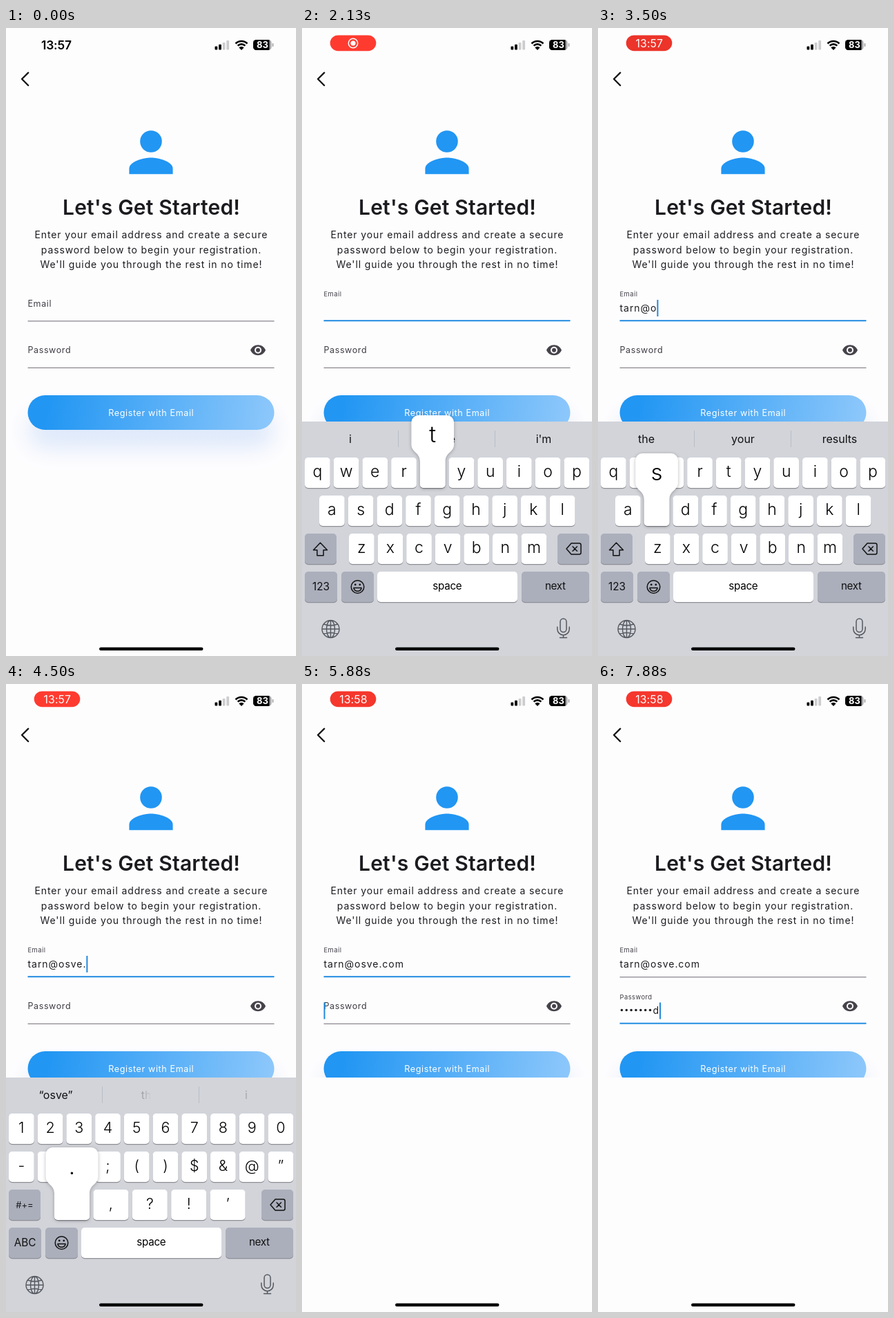
An HTML page with a canvas for the animation above (8 s loop, 420 px wide and 908 px high).

```html
<!DOCTYPE html>
<html lang="en">
<head>
<meta charset="utf-8">
<title>Registration form</title>
<style>
html, body { margin: 0; width: 100%; height: 100%; overflow: hidden; background: #fefdfe; }
canvas { display: block; width: 420px; height: 908px; }
</style>
</head>
<body>
<canvas id="stage"></canvas>
<script>
const W = 420, H = 908, LOOP = 8000, STEP = 125;
const BLUE = '#2196f3', INK = '#1c1b1f', PAGE = '#fefdfe';
const FONT = 'Inter, Roboto, sans-serif';
const canvas = document.getElementById('stage');
const ctx = canvas.getContext('2d');
const dpr = window.devicePixelRatio || 1;
canvas.width = W * dpr;
canvas.height = H * dpr;

// Timeline in ms
const PILL_IN = 500, FOCUS_EMAIL = 1375, CLOCK_BACK = 3000, MINUTE = 5250, FOCUS_PASS = 5875;
const KEYS_TOP = 569, SLIDE = 497;
const presses = [
  [2125, 't'], [2375, 'a'], [2500, 'r'], [2625, 'n'], [3000, '@'], [3250, 'o'],
  [3500, 's'], [3750, 'v'], [4000, 'e'], [4375, '.', 250], [4875, 'c'], [5000, 'o'], [5125, 'm']
].map(([at, key, hold = STEP]) => ({ at, key, hold }));
const SECRET = 'password', SECRET_AT = 6625, SECRET_GAP = 175;

const clamp = v => Math.max(0, Math.min(1, v));
const lerp = (a, b, p) => a + (b - a) * p;
const smooth = p => p * p * (3 - 2 * p);
const easeOut = p => 1 - (1 - p) ** 3;
const ramp = (t, start, dur) => clamp((t - start) / dur);
const mix = (a, b, p) => `rgb(${a.map((v, i) => Math.round(lerp(v, b[i], p)))})`;

function text(s, x, y, size, { color = INK, weight = 400, align = 'center', gap = 0 } = {}) {
  ctx.font = `${weight} ${size}px ${FONT}`;
  ctx.letterSpacing = gap + 'px';
  ctx.textAlign = align;
  ctx.fillStyle = color;
  ctx.fillText(s, align === 'center' ? x + gap / 2 : x, y);
  return ctx.measureText(s).width;
}

function box(x, y, w, h, r, color) {
  ctx.beginPath();
  ctx.roundRect(x, y, w, h, r);
  ctx.fillStyle = color;
  ctx.fill();
}

function disc(x, y, r, color) {
  ctx.beginPath();
  ctx.arc(x, y, r, 0, 7);
  ctx.fillStyle = color;
  ctx.fill();
}

function line(d, x, y, width, color = '#111') {
  ctx.save();
  ctx.translate(x, y);
  ctx.lineWidth = width;
  ctx.lineCap = ctx.lineJoin = 'round';
  ctx.strokeStyle = color;
  ctx.stroke(new Path2D(d));
  ctx.restore();
}

function icon(d, x, y, scale, color) {
  ctx.save();
  ctx.translate(x, y);
  ctx.scale(scale, scale);
  ctx.fillStyle = color;
  ctx.fill(new Path2D(d), 'evenodd');
  ctx.restore();
}

function shadow(color, blur, dy) {
  ctx.shadowColor = color;
  ctx.shadowBlur = blur * dpr;
  ctx.shadowOffsetY = dy * dpr;
}

function statusBar(t) {
  const show = ramp(t, PILL_IN, 250);
  const clock = t < MINUTE ? '13:57' : '13:58';
  ctx.globalAlpha = 1 - show;
  text('13:57', 73, 31.2, 17.4, { weight: 600, color: '#000', gap: -0.1 });
  ctx.globalAlpha = show;
  const glow = 0.5 - 0.5 * Math.cos((t - 1500) / 2000 * Math.PI * 2);
  box(40.7, 10.4, 66.6, 22.8, 11.4, mix([236, 52, 42], [255, 59, 48], clamp(glow * 1.6)));
  if (t < CLOCK_BACK) {
    ctx.beginPath();
    ctx.arc(74, 22, 6.7, 0, 7);
    ctx.lineWidth = 1.5;
    ctx.strokeStyle = '#fff';
    ctx.stroke();
    disc(74, 22, 3.6, '#fff');
  } else {
    text(clock, 74.3, 27.6, 15.8, { color: '#fff', gap: 0.1 });
  }
  ctx.globalAlpha = 1;

  for (let i = 0; i < 4; i++) {
    const h = 5 + i * 2.8;
    box(302.5 + i * 5.6, 31.5 - h, 3.8, h, 1, i < 2 ? '#000' : '#cdccce');
  }
  ctx.strokeStyle = '#000';
  ctx.lineCap = 'butt';
  ctx.lineWidth = 2.6;
  for (const r of [12, 7.6]) {
    ctx.beginPath();
    ctx.arc(341, 31, r, -Math.PI * 0.75, -Math.PI * 0.25);
    ctx.stroke();
  }
  ctx.beginPath();
  ctx.moveTo(341, 32);
  ctx.arc(341, 32, 5.2, -Math.PI * 0.75, -Math.PI * 0.25);
  ctx.fillStyle = '#000';
  ctx.fill();

  box(358, 17, 26.5, 15, 4.5, '#a9a8aa');
  ctx.save();
  ctx.beginPath();
  ctx.rect(357, 16, 24.5, 17);
  ctx.clip();
  box(358, 17, 26.5, 15, 4.5, '#000');
  ctx.restore();
  box(385.6, 22, 1.8, 5, 1, '#a9a8aa');
  text('83', 371.5, 29.2, 13, { weight: 700, color: '#fff' });
}

function field(label, y, focus, filled) {
  const p = smooth(filled);
  text(label, 31.5, y + lerp(4.5, -9.6, p), lerp(12.5, 9.4, p),
    { align: 'left', color: '#3f3d44', gap: lerp(0.6, 0.45, p) });
  const h = lerp(1.1, 2, focus);
  ctx.fillStyle = mix([122, 118, 127], [33, 140, 225], focus);
  ctx.fillRect(31.5, y + 25.8 - h / 2 - focus * 0.6, 357, h);
}

function caret(x, y, t, since) {
  if ((t - since) % 1000 >= 500) return;
  ctx.fillStyle = '#2189dc';
  ctx.fillRect(x, y - 5, 2, 24);
}

function form(t) {
  ctx.save();
  if (t >= FOCUS_PASS) {
    ctx.beginPath();
    ctx.rect(0, 0, W, KEYS_TOP);
    ctx.clip();
  }
  line('M9.2 0L0 9.2L9.2 18.4', 23, 64.6, 2.3);
  disc(210, 164, 15.8, BLUE);
  icon('M12 14c-2.67 0-8 1.34-8 4v2h16v-2c0-2.66-5.33-4-8-4z', 162.6, 132.3, 3.95, BLUE);
  text("Let's Get Started!", 210.5, 270, 30, { weight: 600, gap: 0.2 });
  ['Enter your email address and create a secure',
   'password below to begin your registration.',
   "We'll guide you through the rest in no time!"
  ].forEach((s, i) => text(s, 210, 304.2 + i * 21.6, 14, { gap: 0.88 }));

  const onEmail = ramp(t, FOCUS_EMAIL, 167), onPass = ramp(t, FOCUS_PASS, 167);
  field('Email', 398, onEmail * (1 - onPass), onEmail);
  field('Password', 465.5, onPass, onPass);
  icon('M12 4.5C7 4.5 2.73 7.61 1 12c1.73 4.39 6 7.5 11 7.5s9.27-3.11 11-7.5c-1.73-4.39-6-7.5-11-7.5z' +
       'M12 17a5 5 0 1 1 0-10 5 5 0 0 1 0 10zM12 9a3 3 0 1 0 0 6 3 3 0 0 0 0-6z', 353, 453.7, 1, '#46434b');

  const typed = presses.filter(p => t >= p.at + STEP);
  const email = typed.map(p => p.key).join('');
  const width = email ? text(email, 31.5, 409.5, 14, { align: 'left', gap: 0.95 }) : 0;
  if (t >= FOCUS_EMAIL && t < FOCUS_PASS) {
    const last = typed[typed.length - 1];
    caret(31.5 + width, 398, t, last ? last.at + STEP : FOCUS_EMAIL);
  }

  if (t >= FOCUS_PASS) {
    const n = t < SECRET_AT ? 0 : Math.min(8, 1 + Math.floor((t - SECRET_AT) / SECRET_GAP));
    for (let i = 0; i < n - 1; i++) disc(34.4 + i * 6.85, 471.5, 1.75, INK);
    let x = 31.5;
    if (n) {
      x += (n - 1) * 6.85;
      x += text(SECRET[n - 1], x, 477, 14, { align: 'left', gap: 0.95 });
    }
    caret(x, 465.5, t, n ? SECRET_AT + (n - 1) * SECRET_GAP : FOCUS_PASS);
  }

  const fill = ctx.createLinearGradient(60, 531, 389, 575);
  fill.addColorStop(0, BLUE);
  fill.addColorStop(1, '#8ec8fb');
  ctx.save();
  shadow('rgba(50,125,230,.17)', 34, 26);
  box(31.5, 531, 357, 50, 25, fill);
  ctx.restore();
  text('Register with Email', 210, 560.5, 12.6, { color: '#fff', gap: 0.6 });
  ctx.restore();
}

// Key rows: characters, left edge, key width, pitch
const PLANES = {
  letters: [['qwertyuiop', 4, 36.7, 41.72], ['asdfghjkl', 25, 36.7, 41.72], ['zxcvbnm', 68, 36.7, 41.6]],
  symbols: [['1234567890', 4, 36.7, 41.72], ['-/:;()$&@”', 4, 36.7, 41.72], ['.,?!’', 70, 51, 56.4]]
};

function keyCap(x, y, w, color = '#fff') {
  box(x, y + 1.2, w, 44, 5, '#8d8f95');
  box(x, y, w, 44, 5, color);
}

function popup(k) {
  const { x, y, w, ch } = k, l = x - 12.5, r = x + w + 12.5, top = y - 61;
  ctx.save();
  shadow('rgba(0,0,0,.28)', 5, 1);
  ctx.beginPath();
  ctx.moveTo(l + 10, top);
  ctx.arcTo(r, top, r, top + 10, 10);
  ctx.lineTo(r, y - 19);
  ctx.bezierCurveTo(r, y - 7, x + w, y - 8, x + w, y + 6);
  ctx.arcTo(x + w, y + 44, x + w - 5, y + 44, 5);
  ctx.arcTo(x, y + 44, x, y + 39, 5);
  ctx.lineTo(x, y + 6);
  ctx.bezierCurveTo(x, y - 8, l, y - 7, l, y - 19);
  ctx.arcTo(l, top, l + 10, top, 10);
  ctx.fillStyle = '#fff';
  ctx.fill();
  ctx.restore();
  text(ch, x + w / 2, y - 22, 33, { color: '#000', weight: 300 });
}

function suggestions(t) {
  const put = (s, x, color = '#111') => text(s, x, 599.7, 16, { color });
  if (t >= 4000 && t < 4625) {
    put('“osve”', 72);
    if (t >= 4500) {
      const fade = ctx.createLinearGradient(196, 0, 211, 0);
      fade.addColorStop(0, '#9b9da3');
      fade.addColorStop(1, '#d2d4da');
      put('th', 203, fade);
      put('i', 348, '#a4a6ac');
    }
    return;
  }
  const words = t >= 3125 && t < 4000 ? ['the', 'your', 'results'] : ['i', 'the', "i'm"];
  words.forEach((s, i) => put(s, 70 + i * 140));
}

function keyboard(t) {
  if (t < FOCUS_EMAIL || t >= FOCUS_PASS) return;
  ctx.save();
  ctx.translate(0, Math.round((H - KEYS_TOP) * (1 - easeOut(ramp(t, FOCUS_EMAIL, SLIDE)))));
  ctx.fillStyle = '#d2d4da';
  ctx.fillRect(0, KEYS_TOP, W, H - KEYS_TOP);
  ctx.fillStyle = '#bbbdc4';
  for (const x of [139, 279]) ctx.fillRect(x, 582, 1, 24);
  suggestions(t);

  const symbols = (t >= 2875 && t < 3250) || (t >= 4250 && t < 4750);
  const press = presses.find(p => t >= p.at && t < p.at + p.hold);
  let held = null;
  PLANES[symbols ? 'symbols' : 'letters'].forEach(([chars, left, w, pitch], row) => {
    [...chars].forEach((ch, i) => {
      const x = left + i * pitch, y = 621 + row * 55;
      keyCap(x, y, w);
      if (press && press.key === ch) held = { x, y, w, ch };
      else text(ch, x + w / 2, y + 28.3, symbols ? 21.5 : 23, { color: '#000', weight: 300 });
    });
  });

  const GREY = '#abafbb';
  keyCap(4, 731, 46, GREY);
  keyCap(370, 731, 46, GREY);
  keyCap(4, 786, 47, GREY);
  keyCap(57, 786, 47, GREY);
  keyCap(109, 786, 203);
  keyCap(318, 786, 98, GREY);
  if (symbols) text('#+=', 27, 758, 13);
  else line('M10 0L20 10.5H14.6V18.5H5.4V10.5H0Z', 16.5, 744.2, 1.5);
  line('M7 0H18.5Q21 0 21 2.5V13.5Q21 16 18.5 16H7L0 8ZM9 4.8L15.4 11.2M15.4 4.8L9 11.2', 383, 745, 1.5);
  text(symbols ? 'ABC' : '123', 27.5, 813.3, 15.3, { color: '#111' });
  text('space', 210.5, 812, 15.2, { color: '#000', gap: -0.3 });
  text('next', 367, 812, 15.2, { color: '#111', gap: -0.3 });

  line('M9.3 0A9.3 9.3 0 1 1 -9.3 0A9.3 9.3 0 1 1 9.3 0M-5.6 1.6H5.6A5.7 5.7 0 0 1 -5.6 1.6', 80.5, 808, 1.5);
  disc(77.2, 804.8, 1.4, '#111');
  disc(83.8, 804.8, 1.4, '#111');

  const SOFT = '#55585f';
  line('M12.5 0A12.5 12.5 0 1 1 -12.5 0A12.5 12.5 0 1 1 12.5 0M6 0A6 12.5 0 1 1 -6 0A6 12.5 0 1 1 6 0' +
       'M0 -12.5V12.5M-12.5 0H12.5M-10 -7Q0 -3.5 10 -7M-10 7Q0 3.5 10 7', 41.5, 869, 1.4, SOFT);
  line('M-4.5 -9.5A4.5 4.5 0 0 1 4.5 -9.5V1A4.5 4.5 0 0 1 -4.5 1ZM-8.7 -2V1A8.7 8.7 0 0 0 8.7 1V-2' +
       'M0 9.7V13.5M-5 13.5H5', 378.5, 868, 1.5, SOFT);
  if (held) popup(held);
  ctx.restore();
}

function draw(now) {
  // The screen refreshes eight times a second
  const t = Math.floor((now % LOOP) / STEP) * STEP;
  ctx.setTransform(dpr, 0, 0, dpr, 0, 0);
  ctx.fillStyle = PAGE;
  ctx.fillRect(0, 0, W, H);
  form(t);
  statusBar(t);
  keyboard(t);
  box(135, 895.4, 150.5, 4.6, 2.3, '#000');
}

const start = performance.now();
function tick(now) {
  draw(Math.max(0, now - start));
  requestAnimationFrame(tick);
}
draw(0);
requestAnimationFrame(tick);
</script>
</body>
</html>
```
